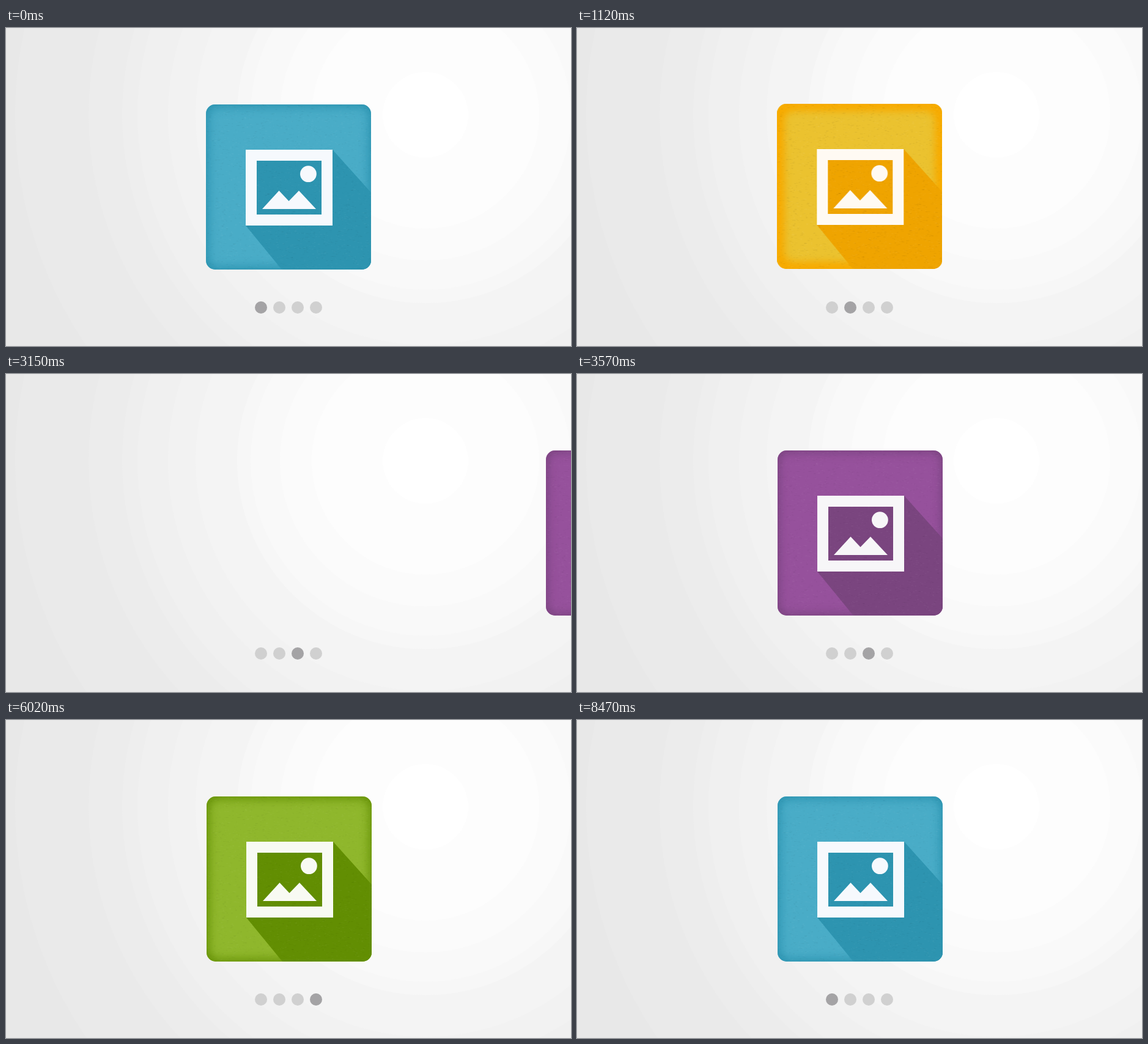
Animation, 924 px wide and 520 px high, one loop 9.73 s. Source, as an HTML page with a canvas:

```html
<!DOCTYPE html>
<html lang="en">
<head>
<meta charset="utf-8">
<title>Card carousel</title>
<style>
  html, body { margin: 0; width: 100%; height: 100%; overflow: hidden; background: #f4f4f4; }
  canvas { display: block; width: 924px; height: 520px; }
</style>
</head>
<body>
<canvas id="stage" width="924" height="520"></canvas>
<script>
const W = 924, H = 520, SIZE = 270, RADIUS = 15;
const LOOP = 9730, TICK = 70, CYCLE = 35;
const STEP = 92.5, SLIDE = 15;

const ctx = document.getElementById('stage').getContext('2d');

const themes = [
  { base: '#49acc7', edge: '#2b93b0', shade: '#2d94b0', icon: '#f6f9fd', spread: 4, blur: 15, grain: 0.05 },
  { base: '#ebc22f', edge: '#f7ab00', shade: '#efa400', icon: '#fffaf3', spread: 12, blur: 12, grain: 0.07 },
  { base: '#96519c', edge: '#7a447f', shade: '#7a457f', icon: '#f7f6f8', spread: 3, blur: 15, grain: 0.05 },
  { base: '#8fb72c', edge: '#659106', shade: '#628e02', icon: '#f8faf3', spread: 4, blur: 15, grain: 0.05 }
];

// Resting place of each card; the first one returns at the end of the strip.
const rests = [[327, 125], [327.3, 124], [328, 125], [328, 125], [328, 125]];

function makeCanvas(w, h) {
  const c = document.createElement('canvas');
  c.width = w;
  c.height = h;
  return c;
}

function seeded(seed) {
  return () => (seed = (seed * 16807) % 2147483647) / 2147483647;
}

function polygon(g, color, points) {
  g.fillStyle = color;
  g.beginPath();
  points.forEach(([x, y]) => g.lineTo(x, y));
  g.fill();
}

function disc(g, color, x, y, r) {
  g.fillStyle = color;
  g.beginPath();
  g.arc(x, y, r, 0, Math.PI * 2);
  g.fill();
}

function drawBackdrop(g) {
  const bands = [
    [671, 234], [551, 236], [496, 238], [471, 240], [421, 242], [376, 244],
    [308, 247], [286, 249], [238, 251], [186, 253], [70, 255]
  ];
  g.fillStyle = '#e8e8e8';
  g.fillRect(0, 0, W, H);
  for (const [r, v] of bands) disc(g, `rgb(${v},${v},${v})`, 686, 142, r);
}

// Blurred inner edge, cast by a ring that lies outside the card.
function drawGlow(g, { edge, spread, blur }) {
  const far = 1000, inner = SIZE - spread * 2;
  g.save();
  g.shadowColor = edge;
  g.shadowBlur = blur;
  g.shadowOffsetX = far;
  g.beginPath();
  g.rect(-far - 60, -60, SIZE + 120, SIZE + 120);
  g.roundRect(spread - far, spread, inner, inner, RADIUS);
  g.fill('evenodd');
  g.restore();
}

function drawGrain(g, strength) {
  const rnd = seeded(71);
  for (let i = 0; i < 5000; i++) {
    const tone = rnd() < 0.5 ? 0 : 255;
    g.fillStyle = `rgba(${tone},${tone},${tone},${rnd() * strength})`;
    g.fillRect(rnd() * SIZE, rnd() * SIZE, 1 + rnd() * 3, 1);
  }
}

function drawIcon(g, { icon, shade }) {
  g.fillStyle = icon;
  g.beginPath();
  g.rect(65, 74, 142, 124);
  g.rect(83, 92, 106, 88);
  g.fill('evenodd');
  disc(g, icon, 167.4, 113.7, 13.4);
  polygon(g, icon, [[92, 171], [119.5, 141], [135.5, 158], [152, 141], [180, 171]]);
}

function makeCard(theme) {
  const c = makeCanvas(SIZE, SIZE), g = c.getContext('2d');
  g.beginPath();
  g.roundRect(0, 0, SIZE, SIZE, RADIUS);
  g.clip();
  g.fillStyle = theme.base;
  g.fillRect(0, 0, SIZE, SIZE);
  drawGlow(g, theme);
  polygon(g, theme.shade, [
    [65, 74], [207, 74], [SIZE, 144], [SIZE, SIZE], [124, SIZE], [65, 198]
  ]);
  drawGrain(g, theme.grain);
  drawIcon(g, theme);
  return c;
}

const backdrop = makeCanvas(W, H);
drawBackdrop(backdrop.getContext('2d'));
const cards = themes.map(makeCard);

function drawCard(index, offset) {
  const [x, y] = rests[index];
  const left = x + offset;
  if (left > -SIZE && left < W) ctx.drawImage(cards[index % 4], left, y);
}

function render(time) {
  const tick = Math.floor((time % LOOP) / TICK);
  const index = Math.floor(tick / CYCLE);
  const phase = tick % CYCLE;
  const slid = Math.min(Math.max(phase - 1, 0), SLIDE);
  const active = (index + (phase >= 8 ? 1 : 0)) % 4;

  ctx.drawImage(backdrop, 0, 0);
  drawCard(index, -slid * STEP);
  drawCard(index + 1, (SLIDE - slid) * STEP);
  for (let i = 0; i < 4; i++) {
    disc(ctx, i === active ? '#a4a3a5' : '#d0d0d0', 417 + i * 30, 457, 10);
  }
}

const start = performance.now();
function loop() {
  render(performance.now() - start);
  requestAnimationFrame(loop);
}
loop();
</script>
</body>
</html>
```
